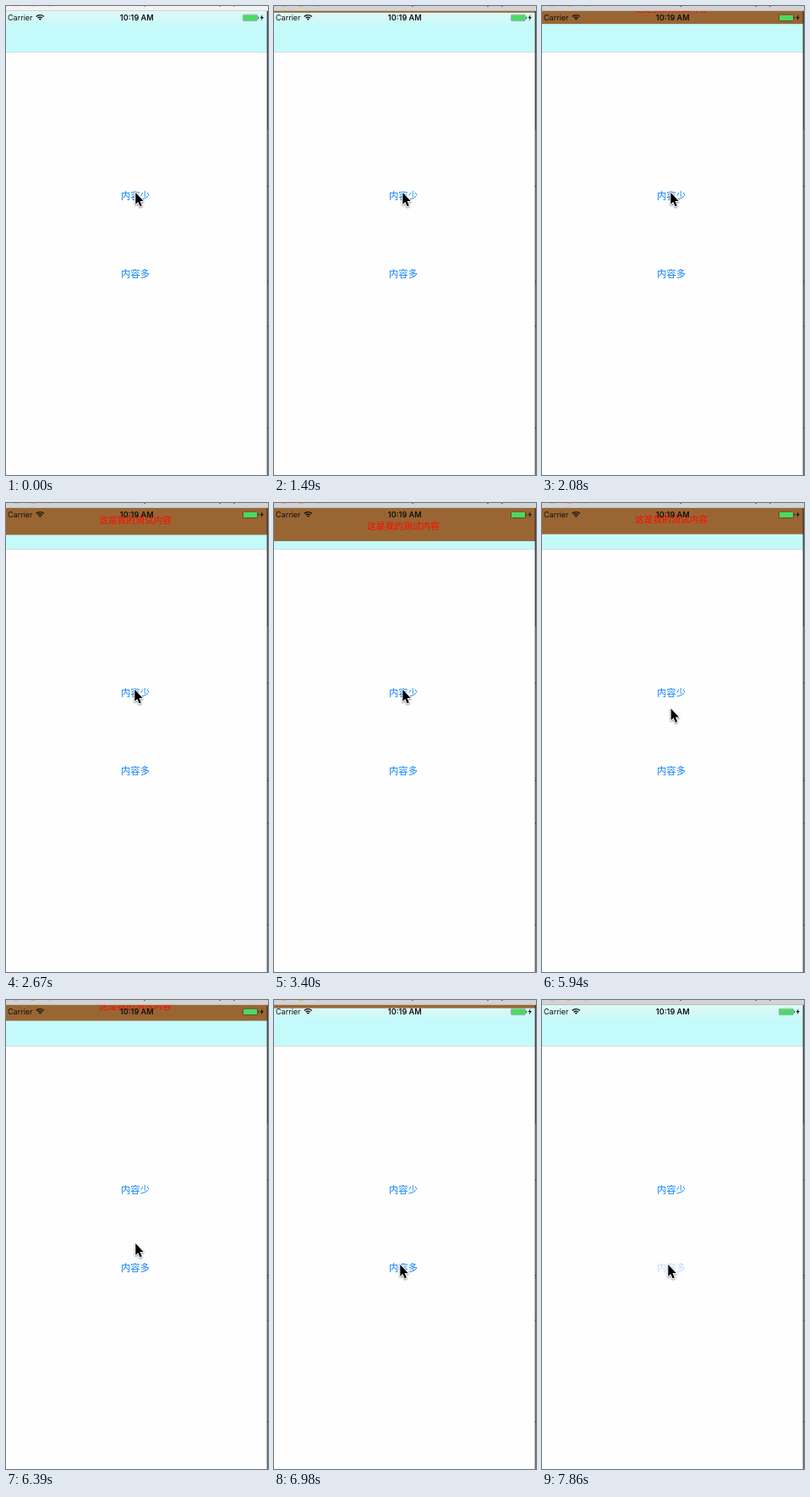
An HTML page with a canvas for the animation above (8000 ms loop, 310 by 553 pixels).

```html
<!DOCTYPE html>
<html lang="zh">
<head>
<meta charset="utf-8">
<title>Drop-down banner</title>
<style>
html, body { margin: 0; width: 100%; height: 100%; overflow: hidden; background: #fefefe; }
canvas { display: block; width: 310px; height: 553px; }
</style>
</head>
<body>
<canvas id="stage"></canvas>
<script>
const W = 310, H = 553, LOOP = 8000, STEP = 147.3;
const TOP = 6, BANNER = 39, SLIDE = 2000;
const LATIN = 'Inter, "Liberation Sans", sans-serif';
const CJK = '"Noto Sans CJK SC", "Noto Sans CJK", sans-serif';
const canvas = document.getElementById('stage');
const ctx = canvas.getContext('2d');
const dpr = window.devicePixelRatio || 1;
canvas.width = W * dpr;
canvas.height = H * dpr;

// Pointer path: time, x, y
const PATH = [[0, 153, 219], [1049, 153, 219], [1050, 152, 219], [5720, 152, 219],
  [6384, 153, 286], [6531, 152, 300], [6680, 150, 308], [6980, 149, 311]];

const clamp = v => Math.min(1, Math.max(0, v));
const ease = p => p * p * (3 - 2 * p);
const slide = (t, start) => ease(clamp((t - start) / SLIDE));

function sample(t) {
  if (t < 1050) return 0;
  const base = t < 5500 ? 1050 : 5500;
  return base + Math.floor((t - base) / STEP + 0.05) * STEP;
}

function pointerAt(t) {
  for (let i = 1; i < PATH.length; i++) {
    const [t0, x0, y0] = PATH[i - 1], [t1, x1, y1] = PATH[i];
    if (t <= t1) {
      const p = (t - t0) / (t1 - t0);
      return [x0 + (x1 - x0) * p, y0 + (y1 - y0) * p];
    }
  }
  return PATH[PATH.length - 1].slice(1);
}

function rect(x, y, w, h, color) {
  ctx.fillStyle = color;
  ctx.fillRect(x, y, w, h);
}

function text(str, x, y, font, color, align = 'center') {
  ctx.font = font;
  ctx.textAlign = align;
  ctx.fillStyle = color;
  ctx.fillText(str, x, y);
}

function poly(points, color) {
  ctx.beginPath();
  points.forEach(([x, y]) => ctx.lineTo(x, y));
  ctx.closePath();
  ctx.fillStyle = color;
  ctx.fill();
}

function titleBar(active) {
  rect(0, 0, W, TOP, active ? '#d3d3d3' : '#f3f3f3');
  const lights = active ? ['#d8b0a8', '#f0b238', '#c2c8be'] : ['#dcdcdc', '#dcdcdc', '#dcdcdc'];
  lights.forEach((color, i) => {
    ctx.beginPath();
    ctx.arc(12 + i * 20, -5, 6, 0, Math.PI * 2);
    ctx.fillStyle = color;
    ctx.fill();
  });
  for (const x of [163, 252, 269]) rect(x, 0, 2, 1, active ? '#777' : '#aaa');
  rect(0, 5, W, 1, active ? '#bdbdbd' : '#d3d3d3');
}

function navBar() {
  const fade = ctx.createLinearGradient(0, TOP, 0, 24);
  fade.addColorStop(0, '#e0f8f6');
  fade.addColorStop(1, '#c5fafa');
  rect(0, TOP, 309, 48, fade);
  rect(0, 54, 309, 1, '#cfe0e0');
}

function banner(t) {
  const shown = slide(t, 1230) - slide(t, 5350);
  if (shown <= 0) return;
  const bottom = TOP + BANNER * shown;
  ctx.save();
  ctx.beginPath();
  ctx.rect(0, TOP, 309, BANNER);
  ctx.clip();
  rect(0, bottom - BANNER, 309, BANNER, '#996633');
  text('这是我的测试内容', 153, bottom - 13.9, '10.75px ' + CJK, '#ff0a00');
  ctx.restore();
}

function statusBar() {
  text('Carrier', 2, 17, '9px ' + LATIN, '#111', 'left');
  text('10:19 AM', 154.7, 17, '600 9.1px ' + LATIN, '#111');

  ctx.strokeStyle = '#111';
  ctx.lineWidth = 1.4;
  for (const r of [3.6, 6.2]) {
    ctx.beginPath();
    ctx.arc(40.3, 16.8, r, -Math.PI * 0.76, -Math.PI * 0.24);
    ctx.stroke();
  }
  poly([[38.9, 15.3], [40.3, 14.5], [41.7, 15.3], [40.3, 17]], '#111');

  ctx.lineWidth = 0.6;
  ctx.strokeStyle = 'rgba(0,0,0,.5)';
  ctx.beginPath();
  ctx.roundRect(280.4, 10.2, 17.2, 7.4, 1.6);
  ctx.stroke();
  rect(281, 10.8, 16, 6.2, '#4cd964');
  rect(298.2, 12.6, 1, 2.6, '#444');
  poly([[303.6, 10], [300.6, 14.3], [302.6, 14.3], [301.7, 17.6], [304.9, 13], [302.9, 13]], '#111');
}

function button(label, baseline, pressed) {
  ctx.globalAlpha = pressed ? 0.27 : 1;
  text(label, 153, baseline, '11.3px ' + CJK, '#0a80fb');
  ctx.globalAlpha = 1;
}

function windowEdge() {
  rect(308, TOP, 1, H - TOP, 'rgba(0,0,0,.25)');
  rect(309, TOP, 1, 140, '#444');
  rect(309, 146, 1, H - 146, '#686868');
  for (const y of [212, 324, 327, 377, 497]) rect(309, y, 1, 1, '#222');
}

function pointer([x, y]) {
  const arrow = [[0, 0], [0, 13.6], [3, 10.8], [5.3, 16.2], [7.5, 15.2], [5.2, 10], [9.4, 10]];
  ctx.save();
  ctx.translate(x + 0.3, y + 1.1);
  ctx.lineWidth = 2;
  ctx.lineJoin = 'round';
  ctx.strokeStyle = '#fff';
  ctx.shadowColor = 'rgba(0,0,0,.4)';
  ctx.shadowBlur = 2 * dpr;
  ctx.shadowOffsetY = dpr;
  poly(arrow, '#000');
  ctx.stroke();
  ctx.shadowColor = 'transparent';
  poly(arrow, '#000');
  ctx.restore();
}

function draw(now) {
  const t = sample(now % LOOP);
  ctx.setTransform(dpr, 0, 0, dpr, 0, 0);
  rect(0, 0, W, H, '#fefefe');
  titleBar(t >= 1050);
  navBar();
  banner(t);
  statusBar();
  button('内容少', 228, t >= 1050 && t < 1150);
  button('内容多', 320, t > 7700);
  windowEdge();
  pointer(pointerAt(t));
}

const start = performance.now();
function tick() {
  draw(performance.now() - start);
  requestAnimationFrame(tick);
}
tick();
</script>
</body>
</html>
```
